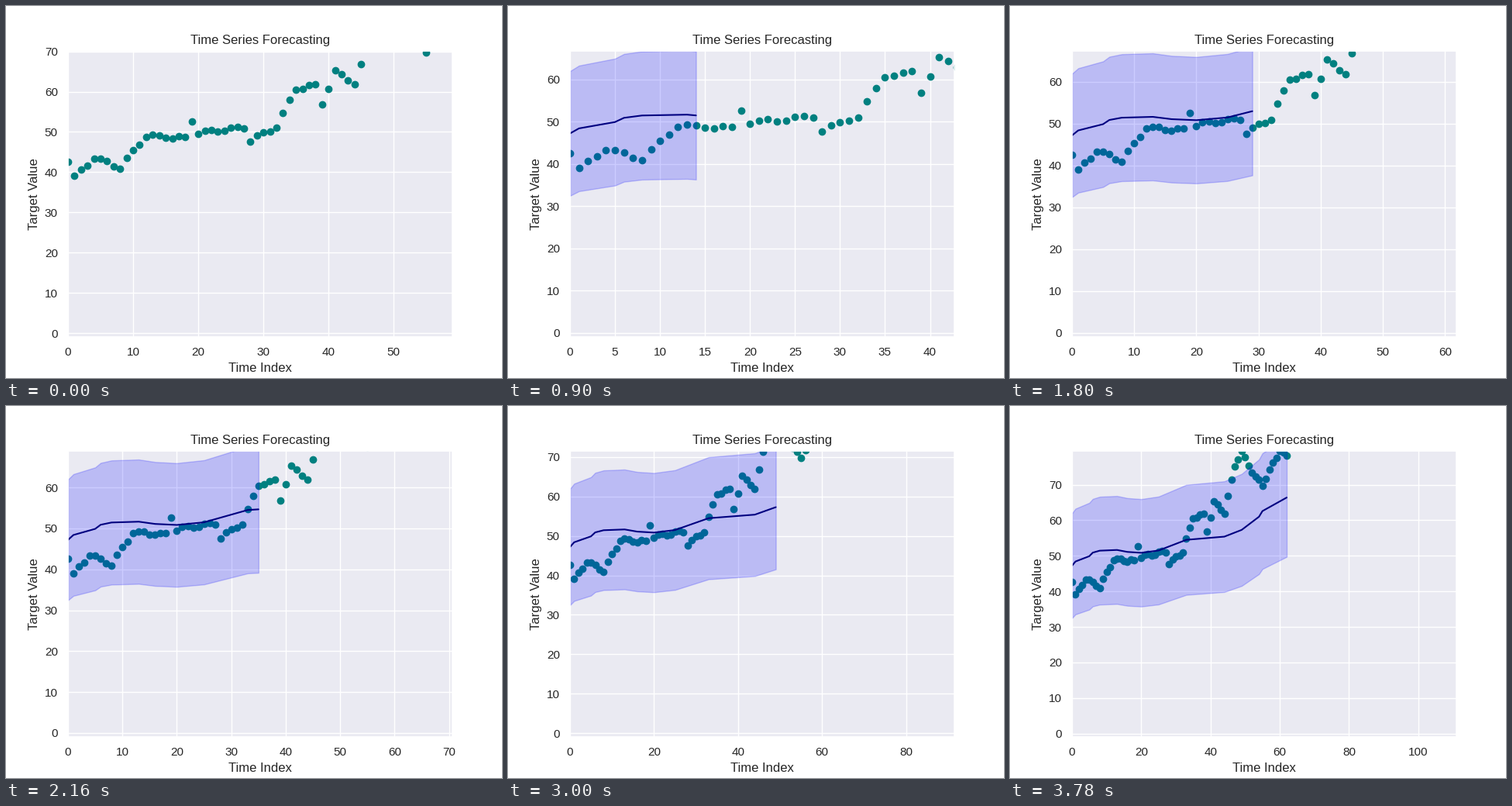
These frames come from a looping animation (640 px wide and 480 px high, 3.84 s). A matplotlib script:

```python
import numpy as np
import matplotlib.pyplot as plt
from matplotlib.animation import FuncAnimation

FRAMES = 64
INTERVAL = 60
KEEP = 0.85  # share of the old axis limit kept at each step

INK = "0.15"
plt.rcParams.update({
    "font.family": "Liberation Sans",
    "font.size": 12,
    "text.color": INK,
    "axes.labelcolor": INK,
    "axes.titlesize": 12,
    "axes.labelsize": 12,
    "axes.facecolor": "#EAEAF2",
    "axes.edgecolor": "white",
    "axes.linewidth": 1.25,
    "axes.grid": True,
    "axes.axisbelow": True,
    "grid.color": "white",
    "grid.linewidth": 1,
    "lines.linewidth": 1.5,
    "lines.solid_capstyle": "round",
    "patch.linewidth": 1,
    "xtick.bottom": False,
    "ytick.left": False,
})
for axis in ("xtick", "ytick"):
    plt.rcParams.update({
        f"{axis}.color": INK,
        f"{axis}.labelsize": 11,
        f"{axis}.major.size": 6,
    })


def through(*knots):
    """Straight segments through a few (time, value) turning points."""
    return np.interp(steps, *zip(*knots))


def ease_limits(start, goals):
    """Move a limit a fixed share of the way to its goal at every step."""
    limits = [start]
    for goal in goals:
        limits.append(KEEP * limits[-1] + (1 - KEEP) * goal)
    return limits


steps = np.arange(FRAMES - 1)

# turning points of the series, plus a small ripple
observed = through(
    (0, 42.9), (1, 38.8), (4, 43.6), (8, 41.2), (12, 49.1), (18, 48.5),
    (19, 52.9), (20, 49.8), (27, 51.2), (28, 47.9), (32, 51.3), (35, 60.8),
    (38, 61.6), (39, 57.1), (41, 65.0), (44, 62.2), (47, 75.5), (49, 79.2),
    (53, 72.0), (55, 70.1), (60, 79.7), (62, 78.0),
) + 0.42 * np.sin(np.pi / 2 * steps - np.pi / 4)

forecast = through(
    (0, 47.2), (1, 48.4), (5, 49.9), (6, 50.9), (8, 51.45), (13, 51.65),
    (16, 51.1), (20, 50.85), (25, 51.5), (33, 54.5), (44, 55.4), (49, 57.3),
    (54, 61.0), (55, 62.6), (62, 66.4),
)
spread = 14.75 + 0.1 * (forecast - forecast[0])
lower, upper = forecast - spread, forecast + spread

right = ease_limits(59, 1.5 * np.arange(1, FRAMES) + 25)
top = ease_limits(70.2, np.maximum.accumulate(upper) + 0.2)

fig, ax = plt.subplots(figsize=(6.4, 4.8), dpi=100)
ax.set_title("Time Series Forecasting")
ax.set_xlabel("Time Index")
ax.set_ylabel("Target Value")
ax.scatter(steps, observed, color="teal")
line, = ax.plot([], [], color="navy")
bands = []


def draw(i):
    while bands:
        bands.pop().remove()
    line.set_data(steps[:i], forecast[:i])
    if i:
        bands.append(ax.fill_between(steps[:i], lower[:i], upper[:i],
                                     color="blue", alpha=0.2))
    ax.set_xlim(0, right[i])
    ax.set_ylim(-1, top[i])
    return [line, *bands]


anim = FuncAnimation(fig, draw, frames=FRAMES, interval=INTERVAL,
                     repeat=True, repeat_delay=0)
plt.show()
```
